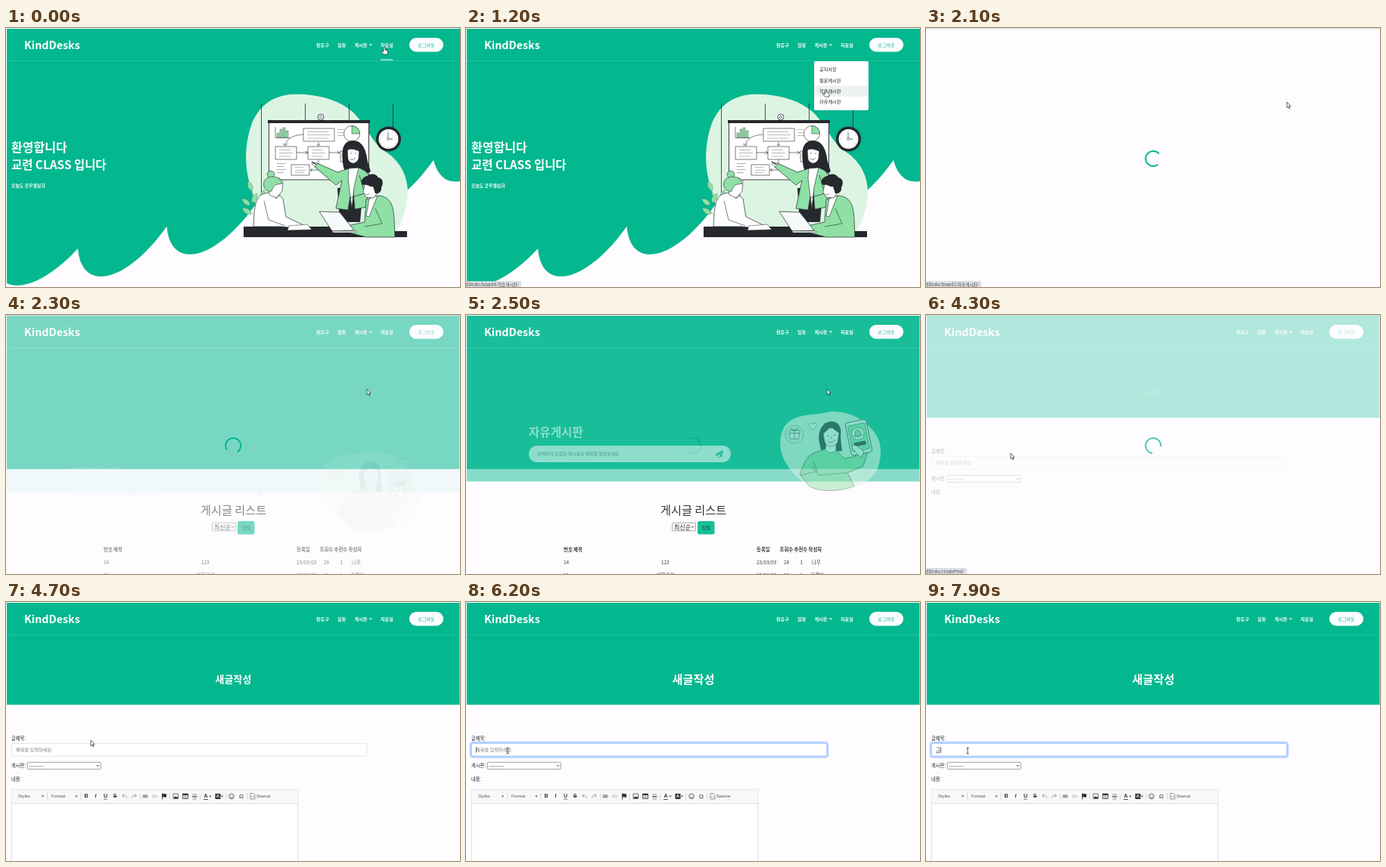
Write an HTML page with a canvas that moves like this. It is 600 px wide and 343 px high and loops after 8000 ms.

```html
<!DOCTYPE html>
<html lang="ko">
<head>
<meta charset="utf-8">
<title>Class board</title>
<style>
html, body { margin: 0; width: 100%; height: 100%; overflow: hidden; background: #fefcff; }
canvas { display: block; width: 100vw; height: 100vh; }
</style>
</head>
<body>
<canvas id="stage"></canvas>
<script>
const W = 600, H = 343, LOOP = 8000;
const GREEN = '#03b78f', PAPER = '#fefcff', INK = '#25282d', LEAF = '#8ee0a5', MINT = '#dcf5e3';
const SANS = '"Noto Sans CJK KR", "Noto Sans", sans-serif';
const UI = '"Liberation Sans", Arial, sans-serif';
const dpr = window.devicePixelRatio || 1;

function makeCanvas(el) {
  el.width = Math.round(W * dpr);
  el.height = Math.round(H * dpr);
  const context = el.getContext('2d');
  context.scale(dpr, dpr);
  return context;
}
const main = makeCanvas(document.getElementById('stage'));
const buffer = makeCanvas(document.createElement('canvas'));
let c = main;

// --- timing helpers ---
const clamp = x => Math.max(0, Math.min(1, x));
const span = (t, from, to) => clamp((t - from) / (to - from));
const within = (t, from, to) => t >= from && t < to;

function bezier(x1, y1, x2, y2) {
  const at = (a, b, u) => 3 * (1 - u) * (1 - u) * u * a + 3 * (1 - u) * u * u * b + u * u * u;
  return x => {
    let lo = 0, hi = 1;
    for (let i = 0; i < 24; i++) {
      const mid = (lo + hi) / 2;
      if (at(x1, x2, mid) < x) lo = mid; else hi = mid;
    }
    return x <= 0 ? 0 : x >= 1 ? 1 : at(y1, y2, lo);
  };
}
const ease = bezier(.25, .1, .25, 1);
const easeOut = bezier(0, 0, .58, 1);
const easeInOut = bezier(.42, 0, .58, 1);

// --- drawing helpers ---
function paint(path, fill, stroke, width = .7) {
  if (fill) { c.fillStyle = fill; c.fill(path); }
  if (stroke) { c.strokeStyle = stroke; c.lineWidth = width; c.stroke(path); }
}
const shape = (d, fill, stroke, width) => paint(new Path2D(d), fill, stroke, width);
function rect(x, y, w, h, fill, stroke, r = 0, width) {
  const p = new Path2D();
  p.roundRect(x, y, w, h, r);
  paint(p, fill, stroke, width);
}
function disc(x, y, r, fill, stroke, width) {
  const p = new Path2D();
  p.arc(x, y, r, 0, Math.PI * 2);
  paint(p, fill, stroke, width);
}
function text(s, x, y, size, color = '#222', weight = 400, align = 'left', family = SANS) {
  c.font = `${weight} ${size}px ${family}`;
  c.fillStyle = color;
  c.textAlign = align;
  c.textBaseline = 'middle';
  c.fillText(s, x, y);
}
function scoped(draw) { c.save(); draw(); c.restore(); }

// Draws a group as one flat layer with a common opacity
function layer(alpha, draw) {
  if (alpha >= 1) return scoped(draw);
  buffer.clearRect(0, 0, W, H);
  c = buffer;
  scoped(draw);
  c = main;
  scoped(() => { c.globalAlpha = alpha; c.drawImage(buffer.canvas, 0, 0, W, H); });
}

// --- shared header ---
function header(underlined) {
  text('KindDesks', 24, 23, 14.3, '#fff', 700);
  [['환응구', 410], ['일정', 438], ['게시판', 460.5], ['자료실', 495]]
    .forEach(([s, x]) => text(s, x, 22.5, 6.1, '#fff', 700));
  shape('M480 21.5h4l-2 2.2z', '#fff');
  rect(533, 13, 45, 18.5, '#fdfdff', null, 9.3);
  text('로그아웃', 555.5, 22.3, 6.1, GREEN, 400, 'center');
  rect(1, 43, 598, .6, 'rgba(255,255,255,.3)');
  if (underlined) rect(495, 41.6, 16.5, 1, '#fff');
}

// --- home page ---
function wave() {
  let d = 'M1 1H600V203C585 205 572 200 565 175';
  for (let k = 3; k >= 0; k--) {
    const x = 95 + k * 117.5, y = 292 - k * 29.25;
    d += `C${x + 65} ${y + 45} ${x + 5} ${y + 60} ${x} ${y}`;
  }
  shape(d + 'C65 325 25 350 1 338Z', GREEN);
}

function plant() {
  shape('M331 262C331 240 328 220 322 207M331 250C322 243 318 238 315 229M331 244C337 236 340 226 340 215', null, '#4f8f68', .6);
  [[323, 210, -.4], [318, 231, -.9], [328, 226, .5], [339, 222, .3], [319, 243, -1], [336, 236, .8]]
    .forEach(([x, y, a]) => scoped(() => {
      c.translate(x, y);
      c.rotate(a);
      shape('M0 6C-5 1 -3 -4 0 -8C3 -4 5 1 0 6Z', LEAF, '#5a8f6c', .4);
    }));
}

function whiteboard() {
  rect(347.5, 125, 132, 76, '#fff', INK, 0, .9);
  rect(346, 122, 135, 4, INK);
  disc(416, 118, 4, '#fff', INK, .8);
  disc(416, 118, 1.6, null, INK, .6);
  shape('M356 131V145.5H375', null, INK, .6);
  [[358, 6], [362, 11], [366, 13], [370, 9]].forEach(([x, h]) => rect(x, 145 - h, 3, h, LEAF, INK, 0, .35));
  [[393, 133, 41, 17], [356, 157, 28, 17], [399, 157, 28, 17], [442, 163, 28, 14], [377, 181, 24, 14]]
    .forEach(([x, y, w, h]) => {
      rect(x, y, w, h, '#fff', INK, 0, .6);
      for (let i = 1; i < 4; i++) rect(x + 5, y + h * i / 4, w - 10 - i % 2 * 3, .5, '#777');
    });
  disc(457, 140, 10.5, '#fff', INK, .6);
  shape('M457 140V129.5A10.5 10.5 0 0 1 467.5 140Z', LEAF, INK, .5);
  shape('M384 165H399M396 163L399 165L396 167M427 165H441M438 163L441 165L438 167M393 141C377 142 370 148 369 156M366 153L369 156L372 153M413 151V156M411 154L413 156L415 154M413 174V188H402M405 186L402 188L405 190', null, INK, .6);
  for (let i = 0; i < 4; i++) {
    rect(358, 179 + i * 4, 12 - i % 2 * 3, .6, '#777');
    if (i < 3) rect(438, 134 + i * 4, 9, .5, '#777');
  }
}

function presenter() {
  shape('M438 212L441 257H468L472 210Z', INK);
  shape('M446 184C443 166 443 150 458 149C473 149 476 164 478 177L482 190L473 195H449Z', INK);
  shape('M453 186L438 191L416 181L411 179L408 184L436 208L444 202L436 239L452 241L458 205L461 240L477 237L479 197C478 190 473 188 466 185Z', LEAF, INK, .7);
  shape('M453 186L466 185L460 211L457 239L452 199Z', '#fff', INK, .6);
  shape('M412 179L406 178L404 180L409 184Z', '#fff', INK, .6);
  shape('M404 177L410 181', null, INK, 1.2);
  shape('M451 160C453 154 464 153 467 160L466 173C463 181 455 181 452 174Z', '#fff', INK, .6);
  shape('M450 165C452 157 463 162 468 164L464 152L453 153Z', INK);
  shape('M455 173Q458 176 462 172M455 166h2M461 166h2', null, INK, .6);
  shape('M467 195L474 219L454 225', null, INK, .7);
}

function seated() {
  // left
  shape('M342 219C334 221 329 228 328 247L327 263H364L391 266L393 261L370 250L366 226C361 220 351 217 342 219Z', '#fff', INK, .7);
  shape('M341 229L347 254L369 262M353 221L357 226L363 221', null, INK, .6);
  disc(350, 194, 4.8, LEAF, INK, .6);
  shape('M347 210L348 221L357 225L365 216L366 203L360 198Z', '#fff', INK, .6);
  shape('M341 210C338 198 351 194 361 199L365 206C357 208 355 205 351 216C346 217 343 215 341 210Z', LEAF, INK, .6);
  // right
  shape('M476 227L493 222C508 224 512 234 513 253L514 277H476L446 269L447 263L474 257Z', LEAF, INK, .7);
  shape('M480 226L491 222L480 250L476 249Z', '#fff', INK, .6);
  shape('M488 239L497 259L474 263', null, INK, .6);
  shape('M474 207L472 217L476 224L486 225L493 215L487 204Z', '#fff', INK, .6);
  shape('M472 208C466 203 473 196 478 196C483 191 490 194 492 198C499 199 499 207 496 211C497 217 492 220 488 219L485 210C480 211 478 206 472 208Z', INK);
  shape('M475 220Q478 222 480 219', null, INK, .5);
}

function lesson() {
  shape('M375 88C405 86 438 93 458 111C477 129 482 151 502 164C525 179 534 204 530 228C527 252 519 268 507 277H340C339 255 329 238 323 209C314 180 316 151 325 126C335 103 351 91 375 88Z', MINT);
  [[337, 100, 222], [395, 100, 122], [453, 100, 122], [511, 100, 132]]
    .forEach(([x, a, b]) => rect(x, a, .8, b - a, INK));
  plant();
  whiteboard();
  disc(505.5, 147, 16.5, INK);
  disc(505.5, 147, 13, '#fff');
  for (let i = 0; i < 12; i++) {
    const a = i * Math.PI / 6;
    disc(505.5 + 11 * Math.cos(a), 147 + 11 * Math.sin(a), .4, INK);
  }
  shape('M505 147V138M505 147H511', null, INK, .7);
  disc(505, 147, 1.5, '#fff', INK, .5);
  presenter();
  shape('M316 263H432L438 269H530V277H314V263Z', INK);
  seated();
  shape('M414 243L441 244L460 268L431 269Z', '#f7f9fa', INK, .7);
  shape('M431 269H463V271H432Z', '#fff', INK, .5);
  shape('M374 262L398 260L404 267L372 268Z', '#fff', INK, .5);
}

const MENU = [['공지사항', 2], ['질문게시판', 3], ['학습게시판', 4], ['자유게시판', 1]];
const ITEM = 14.4, MENU_TOP = 44;
const itemAt = y => Math.max(0, Math.min(3, Math.floor((y - MENU_TOP - 3.6) / ITEM)));

function dropdown(t, pointer) {
  const p = ease(span(t, 400, 900));
  if (!p) return;
  layer(p, () => {
    c.translate(460, MENU_TOP);
    c.scale(1, Math.cos((1 - p) * 75 * Math.PI / 180));
    rect(0, 0, 72, 65, '#fff', 'rgba(0,0,0,.12)', 2, .5);
    if (pointer.y > MENU_TOP) rect(.3, 3.6 + itemAt(pointer.y) * ITEM, 71.4, ITEM, '#edf0f1');
    MENU.forEach(([s], i) => text(s, 7, 3.6 + ITEM * (i + .5), 6.2, '#212529'));
  });
}

function home(t, pointer) {
  wave();
  header(t < 300);
  text('환영합니다', 7, 158, 16, '#fff', 700);
  text('교련 CLASS 입니다', 7, 181.5, 15.4, '#fff', 700);
  text('오늘도 공부열심히', 7, 208.5, 5.9, '#fff', 700);
  lesson();
  dropdown(t, pointer);
}

// --- board page ---
function messenger() {
  shape('M481 67C508 66 524 77 537 91C549 104 550 121 546 136C541 157 518 171 489 172C459 174 436 156 424 137C411 116 414 95 423 84C438 68 459 73 481 67Z', MINT);
  disc(434, 97, 12, null, '#4f5d58', .5);
  rect(428, 95, 12, 8, '#fff', INK, 0, .6);
  rect(427, 92, 14, 3.5, '#fff', INK, 0, .6);
  shape('M434 92V103M434 92C427 91 428 86 434 92C440 86 441 91 434 92', null, INK, .6);
  shape('M458 91C449 84 456 80 458 84C461 79 468 85 458 91Z', '#fff', INK, .5);
  shape('M467 108C464 92 472 80 483 80C494 80 497 90 495 101L497 119L470 121Z', INK);
  shape('M475 116L459 122C450 126 445 139 441 150L454 166C469 174 495 173 513 165L504 148L525 139L532 117L517 115L515 126L500 129L489 118Z', LEAF, INK, .7);
  shape('M457 139L466 151L504 148M459 132L464 146L441 151', null, INK, .6);
  shape('M476 108L475 118Q482 125 489 118L489 107Z', '#fff', INK, .6);
  shape('M472 95C472 88 490 85 493 95L491 108C486 115 477 114 474 107Z', '#fff', INK, .6);
  shape('M470 98C476 93 480 90 482 85C485 91 490 93 494 96L489 82H474Z', INK);
  shape('M478 106Q483 110 488 104M477 99h3M486 98h3M483 100v3', null, INK, .7);
  scoped(() => {
    c.translate(519, 101);
    c.rotate(-.2);
    rect(-14, -22, 28, 44, '#fff', INK, 3, .8);
    rect(-11.5, -17.5, 23, 35, LEAF, INK, 1, .5);
    disc(0, -5, 8, '#fff', INK, .5);
    shape('M-5 -2C-3 -5 -4 -10 0 -10C4 -10 3 -5 5 -2ZM-1.5 -1H1.5', LEAF, INK, .7);
    rect(-8, 6, 16, 5, INK, null, 1);
  });
  shape('M514 119C508 115 510 110 516 112L526 120L522 128Z', '#fff', INK, .6);
}

function plane(x, y) {
  scoped(() => {
    c.translate(x, y);
    shape('M0 1.5L11 -5L9 5L5.5 3.5L9 -2L3.5 3ZM4 4L6 5L4 6.5Z', GREEN);
  });
}

function selectBox(x, y, w, h, label, size) {
  rect(x, y, w, h, '#fff', '#777', 1, .7);
  text(label, x + 2.5, y + h / 2, size, '#111');
  shape(`M${x + w - 6} ${y + h / 2 - 1}l2 2l2 -2`, null, '#222', .8);
}

function board(t) {
  const p = ease(span(t, 2200, 3200));
  rect(1, 1, 598.5, 203, GREEN);
  if (p < 1) scoped(() => {
    c.globalAlpha = p;
    rect(1, 204, 598.5, 34 * (1 - p), GREEN);
  });
  header();
  if (p) layer(p, () => {
    c.translate(0, 126 * (1 - p));
    text('자유게시판', 83, 94, 15.6, '#fff', 700);
    rect(83, 112, 267, 22, '#fdfdff', null, 11);
    text('검색어가 포함된 게시글과 제목을 찾아보세요', 94, 123, 5.9, '#666');
    plane(329, 122.5);
    rect(83.3, 172.3, 60.5, 26, null, '#e9fff8', 13, .8);
    text('글쓰기', 114, 185, 6.4, '#fff', 400, 'center');
    messenger();
  });
  text('게시글 리스트', 257, 258, 15.2, '#222');
  selectBox(272.5, 275.3, 31, 10.5, '최신순', 8);
  rect(306, 273, 22.5, 17.5, GREEN, null, 2.5);
  text('정렬', 317.3, 282, 6.2, '#12342c', 400, 'center');
  const cells = (row, y, weight) => row.forEach(([s, x]) => text(s, x, y, 6.4, '#222', weight));
  cells([['번호', 129], ['제목', 142], ['등록일', 384], ['조회수', 414.5], ['추천수', 433.5], ['작성자', 452.5]], 311, 700);
  cells([['14', 129], ['123', 258], ['23/03/03', 384], ['28', 420], ['1', 441.5], ['나무', 457]], 328, 400);
  cells([['13', 129], ['대학교의', 252], ['23/03/03', 384], ['19', 420], ['1', 441.5], ['구름이', 455]], 344.5, 400);
}

// --- writing page ---
function toolbar() {
  rect(7.3, 248.3, 378.5, 110, '#fff', '#d1d1d1', 0, .7);
  rect(7.6, 248.6, 378, 18, '#f8f8f8');
  rect(7, 266.5, 379, .7, '#d1d1d1');
  const mark = (s, x, weight = 700, size = 7) => text(s, x, 257.5, size, '#333', weight, 'center', UI);
  text('Styles', 16, 257.5, 5.8, '#555', 400, 'left', UI);
  text('Format', 60, 257.5, 5.8, '#555', 400, 'left', UI);
  text('Source', 331, 257.5, 5.8, '#444', 400, 'left', UI);
  [48.5, 93, 270, 285.5].forEach(x => shape(`M${x - 1.7} 256.6h3.4l-1.7 2z`, '#444'));
  [54.5, 98.5, 177, 216.5, 256.5, 290.5, 318.5].forEach(x => rect(x, 253, .6, 9, '#c4c4c4'));
  mark('B', 106);
  mark('I', 118.5, 'italic 700');
  mark('U', 131.5);
  rect(129, 260.7, 5, .7, '#333');
  mark('S', 144);
  rect(141.5, 257, 5.5, .7, '#333');
  shape('M159 260C160 256 157 255.5 154 256.5M156 254L153.5 256.7L156.5 258.5M167 260C166 256 169 255.5 172 256.5M170 254L172.5 256.7L169.5 258.5', null, '#aaa', 1);
  [[184, '#555'], [196.5, '#bbb']].forEach(([x, color]) => {
    rect(x - 3, 255.8, 3, 3, null, color, 1, .9);
    rect(x, 255.8, 3, 3, null, color, 1, .9);
  });
  shape('M206.5 253.5V261.5', null, '#333', .9);
  shape('M207 254C209 253 210 255 212 254V258.5C210 259.5 209 257.5 207 258.5Z', '#333');
  rect(221, 254, 6.5, 6.5, '#fff', '#444', 0, .8);
  shape('M221.5 260L223.5 257L225 258.5L226 257.5L227.5 260Z', '#333');
  rect(233.5, 254, 7, 6.5, '#fff', '#333', 0, .8);
  rect(233.5, 254, 7, 2, '#333');
  shape('M237 256V260.5M233.5 258.3H240.5', null, '#333', .5);
  [254, 255.6, 259.4, 261].forEach(y => rect(246.5, y, 5.5, .6, '#888'));
  rect(246, 257.2, 6.5, 1, '#333');
  mark('A', 264);
  rect(261, 261, 6, .8, '#333');
  rect(276.5, 253.8, 7, 7.2, '#333');
  text('A', 280, 257.7, 6, '#fff', 700, 'center', UI);
  disc(298, 257.3, 3.4, null, '#333', .7);
  shape('M296 258.5Q298 260.5 300 258.5M296.5 256v.8M299.5 256v.8', null, '#333', .6);
  mark('Ω', 311, 400, 8);
  shape('M323 253.5H327L329 255.5V261H323Z', '#fff', '#555', .6);
  shape('M325.5 256.5L324.3 258L325.5 259.5M326.7 256.5L327.9 258L326.7 259.5', null, '#555', .5);
}

function titleField(t) {
  const focus = ease(span(t, 5250, 5400));
  if (focus) rect(6, 186, 472, 19.5, null, `rgba(134,183,254,${.6 * focus})`, 3, 2.5);
  rect(7.3, 187.3, 469.5, 16.7, '#fff', focus > .5 ? '#86b7fe' : '#d4d8dc', 2.2, .7);
  const typed = t >= 7900 ? '그' : t >= 7000 ? 'ㄱ' : '';
  if (typed) {
    text(typed, 13, 195.3, 6.4, '#222');
    rect(13, 199, 5.8, .6, '#333');
  } else {
    text('제목을 입력하세요.', 13, 195.5, 6.2, '#777');
  }
  const lit = within(t, 5250, 5600) || within(t, 6150, 6700) || t >= 6900;
  if (lit) rect(typed ? 19 : 13, 192, .7, 7.5, '#222');
}

function writing(t) {
  rect(1, 1, 598.5, 135, GREEN);
  header();
  const p = span(t, 4210, 5210);
  if (p) scoped(() => {
    const size = .3 + .7 * ease(p);
    c.globalAlpha = ease(clamp(p * 2));
    c.translate(300.5, 102.5);
    c.scale(size, size);
    text('새글작성', 0, 0, 15.2, '#fff', 700, 'center');
  });
  text('글제목:', 7, 181, 6.3);
  text('게시판:', 7, 216.5, 6.3);
  text('내용:', 7, 235, 6.3);
  titleField(t);
  selectBox(28.3, 212.3, 97, 9, '---------', 6.2);
  if (t >= 4500) toolbar();
}

// --- preloader, pointer, status line ---
function preloader(t, fadeAt, spinAt) {
  const alpha = 1 - easeOut(span(t, fadeAt, fadeAt + 515));
  if (!alpha) return;
  layer(alpha, () => {
    rect(0, 1, W, H, PAPER);
    const turn = (t - spinAt) / 750 * Math.PI * 2;
    c.beginPath();
    c.arc(300.3, 173, 10, turn + Math.PI / 4, turn + Math.PI * 7 / 4);
    c.strokeStyle = '#08b592';
    c.lineWidth = 2;
    c.stroke();
  });
  if (alpha > .3) rect(0, 0, W, 1.3, '#c9ddda');
}

// time, x, y of the pointer's stops
const TRACK = [
  [0, 500, 25], [100, 500, 25], [450, 471, 23], [700, 472, 40], [1500, 477, 98], [2600, 477, 98],
  [3150, 264, 211], [3220, 264, 211], [3680, 112, 183], [4750, 112, 183], [5200, 55, 197], [8000, 55, 197]
];
function pointerAt(t) {
  const i = TRACK.findIndex(stop => stop[0] > t);
  const [t0, x0, y0] = TRACK[i - 1], [t1, x1, y1] = TRACK[i];
  const p = easeInOut(span(t, t0, t1));
  return { x: x0 + (x1 - x0) * p, y: y0 + (y1 - y0) * p };
}

function pointer(t, { x, y }) {
  scoped(() => {
    c.translate(x, y);
    if (t < 1900 || within(t, 3650, 3950)) {
      shape('M-1 1Q0 -1 1 1V4L4 5Q5 5.5 4.5 8L4 10H-1L-4 6Q-3.5 4.5 -1 6.5Z', '#fff', '#222', .7);
    } else if (t > 5150) {
      shape('M-1.7 -4Q0 -4 0 -3Q0 -4 1.7 -4M0 -3V3M-1.7 4Q0 4 0 3Q0 4 1.7 4', null, '#222', .8);
    } else {
      shape('M0 0V7.5L1.7 6L2.9 8.7L4 8.2L2.9 5.6H5Z', '#fff', '#222', .7);
    }
  });
}

function statusLine(t, at) {
  let path = '';
  if (within(t, 700, 2300) && at.y > 47) {
    const [name, id] = MENU[itemAt(at.y)];
    path = `board${id}/${name}/`;
  } else if (within(t, 3700, 4450)) {
    path = 'createPost/';
  }
  if (!path) return;
  const line = 'dDesks/' + path;
  c.font = `400 5.6px ${SANS}`;
  c.textAlign = 'left';
  rect(-2, 335.5, c.measureText(line).width + 5, 10, '#dfe3e8', '#c5cbd2', 1.5, .5);
  text(line, 0, 340, 5.6, '#444');
}

function render(t) {
  const at = pointerAt(t);
  rect(0, 0, W, H, PAPER);
  if (t < 1900) {
    home(t, at);
  } else if (t < 3950) {
    board(t);
    preloader(t, 2110, 2090);
  } else {
    writing(t);
    preloader(t, 4200, 4195);
  }
  statusLine(t, at);
  pointer(t, at);
}

const start = performance.now();
function tick() {
  render((performance.now() - start) % LOOP);
  requestAnimationFrame(tick);
}
tick();
</script>
</body>
</html>
```
